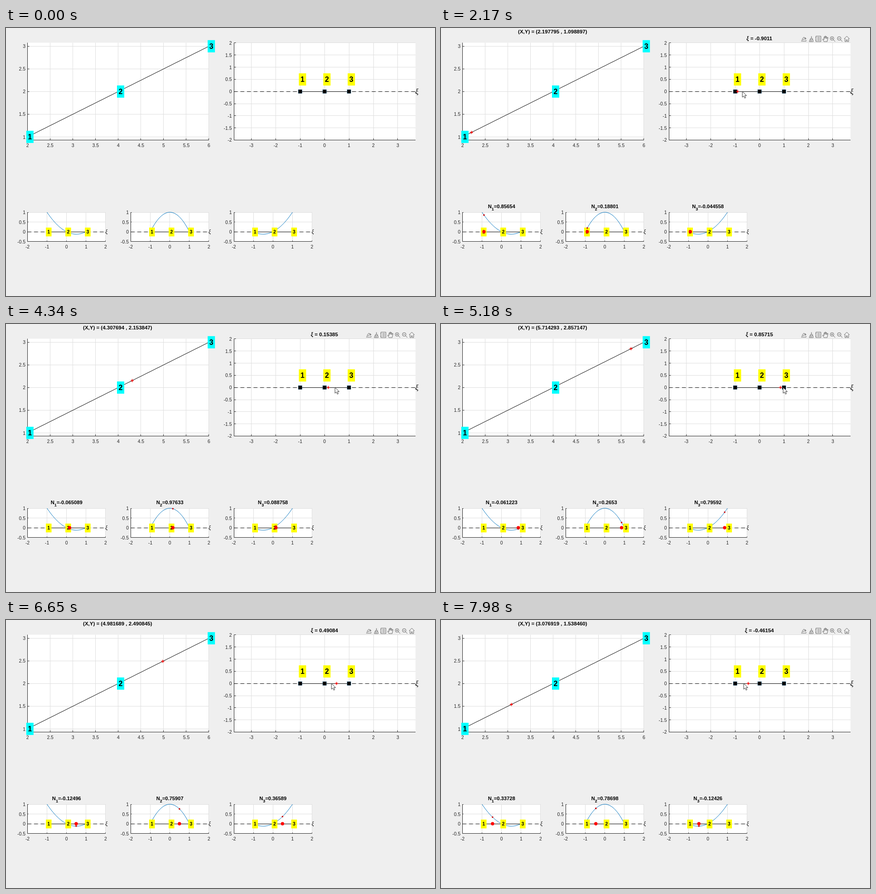
An HTML page with a canvas that plays this animation: 947x592 px, repeating every 8000 ms.

```html
<!DOCTYPE html>
<html>
<head>
<meta charset="utf-8">
<style>
html, body { margin: 0; width: 100%; height: 100%; overflow: hidden; background: #efefef; }
canvas { display: block; }
</style>
</head>
<body>
<canvas id="stage" width="947" height="592"></canvas>
<script>
const ctx = document.getElementById('stage').getContext('2d');
const SANS = '"Liberation Sans", Arial, sans-serif';
const SERIF = '"Liberation Serif", "DejaVu Serif", serif';
const INK = '#262626', GRID = '#dedede';
const LOOP = 8000, STEP = 70, START = 490, LAG = 300;

// Pointer position along the xi axis: [ms, xi]. The marker follows LAG ms later.
const path = [
  [190, -.82], [1100, -.985], [1730, -.985], [1870, -.9011026], [2170, -.705],
  [2780, -.358976], [3360, -.358976], [4040, .153847], [4340, .427],
  [4880, .8571466], [5040, .965], [5600, .965], [6350, .4908446],
  [6650, .28], [7680, -.4615403], [7980, -.65]
];

const shapes = [x => x * (x - 1) / 2, x => 1 - x * x, x => x * (x + 1) / 2];
const range = (a, b, step) => Array.from({ length: Math.round((b - a) / step) + 1 }, (_, i) => a + i * step);

const makeAxes = (left, top, right, bottom, x0, sx, y0, sy, xTicks, yTicks) => ({
  left, top, right, bottom, xTicks, yTicks, x: v => x0 + v * sx, y: v => y0 - v * sy
});
const physical = makeAxes(47.5, 32.5, 448, 247.5, -152.6, 100.1, 340.6, 100.1, range(2, 6, .5), range(1, 3, .5));
const natural = makeAxes(503, 33, 904, 247.5, 703.2, 53.9, 140.2, 53.6, range(-3, 3, 1), range(-2, 2, .5));
const plots = [47.5, 275.5, 503].map(l =>
  makeAxes(l, 407, l + 172.3, 471.5, l + 86.2, 43.1, 450, 43, range(-2, 2, 1), range(-.5, 1, .5)));

function pointer(t) {
  const i = path.findIndex(p => p[0] >= t);
  if (i < 0) return path[path.length - 1][1];
  if (!i) return path[0][1];
  const [t0, a] = path[i - 1], [t1, b] = path[i];
  return a + (b - a) * (t - t0) / (t1 - t0);
}

function line(points, color, width = 1, dash = []) {
  ctx.beginPath();
  points.forEach(p => ctx.lineTo(...p));
  ctx.setLineDash(dash);
  ctx.strokeStyle = color;
  ctx.lineWidth = width;
  ctx.stroke();
  ctx.setLineDash([]);
}

function text(s, x, y, font, align = 'center', color = '#000') {
  ctx.font = font;
  ctx.textAlign = align;
  ctx.textBaseline = 'alphabetic';
  ctx.fillStyle = color;
  ctx.fillText(s, x, y);
}

// Centred line made of [string, font, drop] pieces.
function richText(parts, x, y) {
  const widths = parts.map(([s, font]) => (ctx.font = font, ctx.measureText(s).width));
  x -= widths.reduce((a, b) => a + b) / 2;
  parts.forEach(([s, font, drop = 0], i) => {
    text(s, x, y + drop, font, 'left');
    x += widths[i];
  });
}

function dot(x, y, r, color) {
  ctx.beginPath();
  ctx.arc(x, y, r, 0, 7);
  ctx.fillStyle = color;
  ctx.fill();
}

const snap = v => Math.floor(v) + .5;

function drawAxes(ax) {
  const { left, top, right, bottom } = ax, font = '10.4px ' + SANS;
  const l = snap(left), b = snap(bottom), tick = right - left > 200 ? 4 : 2;
  ctx.fillStyle = '#fff';
  ctx.fillRect(left, top, right - left, bottom - top);
  for (const v of ax.xTicks) {
    const x = snap(ax.x(v));
    line([[x, top], [x, bottom]], GRID);
    line([[x, b], [x, b - tick]], INK);
    text(+v.toFixed(1), ax.x(v), bottom + 15, font, 'center', INK);
  }
  for (const v of ax.yTicks) {
    const y = snap(ax.y(v));
    line([[left, y], [right, y]], GRID);
    line([[l, y], [l + tick, y]], INK);
    text(+v.toFixed(1), left - 4.5, ax.y(v) + 4, font, 'right', INK);
  }
  line([[l, top], [l, b], [right, b]], INK);
}

function xiLine(ax, size) {
  const y = snap(ax.y(0));
  line([[ax.left, y], [ax.right, y]], '#000', 1, [8.5, 6]);
  line([[ax.x(-1), y], [ax.x(1), y]], '#000');
  text('ξ', ax.right + size * .17, y + size * .33, `italic ${size}px ${SERIF}`, 'center');
}

function tag(n, x, y, w, h, size, color) {
  ctx.fillStyle = color;
  ctx.fillRect(x - 3, y - h / 2, w, h);
  text(n, x - 3 + w / 2, y + size * .36, `bold ${size}px ${SANS}`);
}

function star(x, y) {
  for (let i = 0; i < 4; i++) {
    const a = i * Math.PI / 4, r = i % 2 ? 2.8 : 3.7;
    const dx = r * Math.cos(a), dy = r * Math.sin(a);
    line([[x - dx, y - dy], [x + dx, y + dy]], '#f00');
  }
}

const icons = [
  'M-6 5H5V3M-4 1L0-4L3-1M-5 3L4-1M2-3L5-1L3 2',
  'M1-6V-1M-1-1H3L5 6H-4ZM-2 2H4M0 3V6',
  'M-5-6H6V6H-5ZM-2-3H4M-2 0H4M-2 3H4M-6-3H-4M-6 3H-4',
  'M-3 6L-6 1L-5 0L-3 2V-4L-2-5L-1-4V-1V-6H1V-1V-5L3-5V0L4-3L6-3L4 6Z',
  'M3-1A4 4 0 1 1-5-1A4 4 0 1 1 3-1M2 2L6 6M-3-1H1M-1-3V1',
  'M3-1A4 4 0 1 1-5-1A4 4 0 1 1 3-1M2 2L6 6M-3-1H1',
  'M-6 0L0-6L6 0M-4-1V6H-1V2H1V6H4V-1'
].map(d => new Path2D(d));

function toolbar() {
  ctx.strokeStyle = '#686868';
  ctx.lineWidth = 1;
  icons.forEach((icon, i) => {
    ctx.save();
    ctx.translate(801 + i * 15.8, 24);
    ctx.stroke(icon);
    ctx.restore();
  });
}

const arrow = new Path2D('M0 0V13L3 10.2L5.2 15L7.4 14L5.3 9.4H9.3Z');

function cursor(x, y) {
  ctx.save();
  ctx.translate(x, y);
  ctx.fillStyle = '#fff';
  ctx.fill(arrow);
  ctx.strokeStyle = '#333';
  ctx.lineWidth = 1;
  ctx.stroke(arrow);
  ctx.restore();
}

function drawScene() {
  ctx.fillStyle = '#efefef';
  ctx.fillRect(0, 0, 947, 592);
  [physical, natural, ...plots].forEach(drawAxes);

  line([2, 6].map(v => [physical.x(v), physical.y(v / 2)]), '#000');
  xiLine(natural, 17);
  [-1, 0, 1].forEach((v, i) => {
    const x = natural.x(v), y = natural.y(0);
    ctx.fillStyle = '#000';
    ctx.strokeStyle = '#0b4468';
    ctx.lineWidth = .7;
    ctx.fillRect(x - 4, y - 4, 8, 8);
    ctx.strokeRect(x - 4, y - 4, 8, 8);
    tag(i + 1, x + .2, 113.6, 16, 27, 16, '#ff0');
    tag(i + 1, physical.x(4 + 2 * v) + .2, physical.y(2 + v), 16, 27, 16, '#0ff');
  });

  plots.forEach((ax, k) => {
    xiLine(ax, 11.5);
    line(range(-1, 1, .05).map(v => [ax.x(v), ax.y(shapes[k](v))]), '#0072bd');
    [-1, 0, 1].forEach((v, i) => tag(i + 1, ax.x(v) + .4, 450.6, 12.5, 19.5, 10.5, '#ff0'));
  });
}

function drawProbe(t) {
  const xi = pointer(t - LAG), X = 4 + 2 * xi, Y = 2 + xi;
  const short = v => String(+v.toPrecision(5));
  const bold = 'bold 11.5px ' + SANS, small = 'bold 11.2px ' + SANS;

  text(`(X,Y) = (${X.toFixed(6)} , ${Y.toFixed(6)})`, 246.3, 12, bold);
  richText([['ξ', `italic bold 12px ${SERIF}`], [' = ' + short(xi), bold]], 702.8, 27);
  star(physical.x(X), physical.y(Y));
  star(natural.x(xi), natural.y(0));

  plots.forEach((ax, k) => {
    const n = shapes[k](xi);
    richText([['N', small], [k + 1, 'bold 9px ' + SANS, 4.5], ['=' + short(n), small]], ax.x(0), 398);
    dot(ax.x(xi), ax.y(0), 3.7, '#f00');
    dot(ax.x(xi), ax.y(n), 1.8, '#d01010');
  });

  toolbar();
  const drop = Math.min(1, (t - START) / 700);
  cursor(natural.x(pointer(t)), 5 + 135 * drop);
}

function frame(now) {
  const t = Math.floor(now % LOOP / STEP) * STEP;
  drawScene();
  if (t >= START) drawProbe(t);
  requestAnimationFrame(frame);
}
requestAnimationFrame(frame);
</script>
</body>
</html>
```
